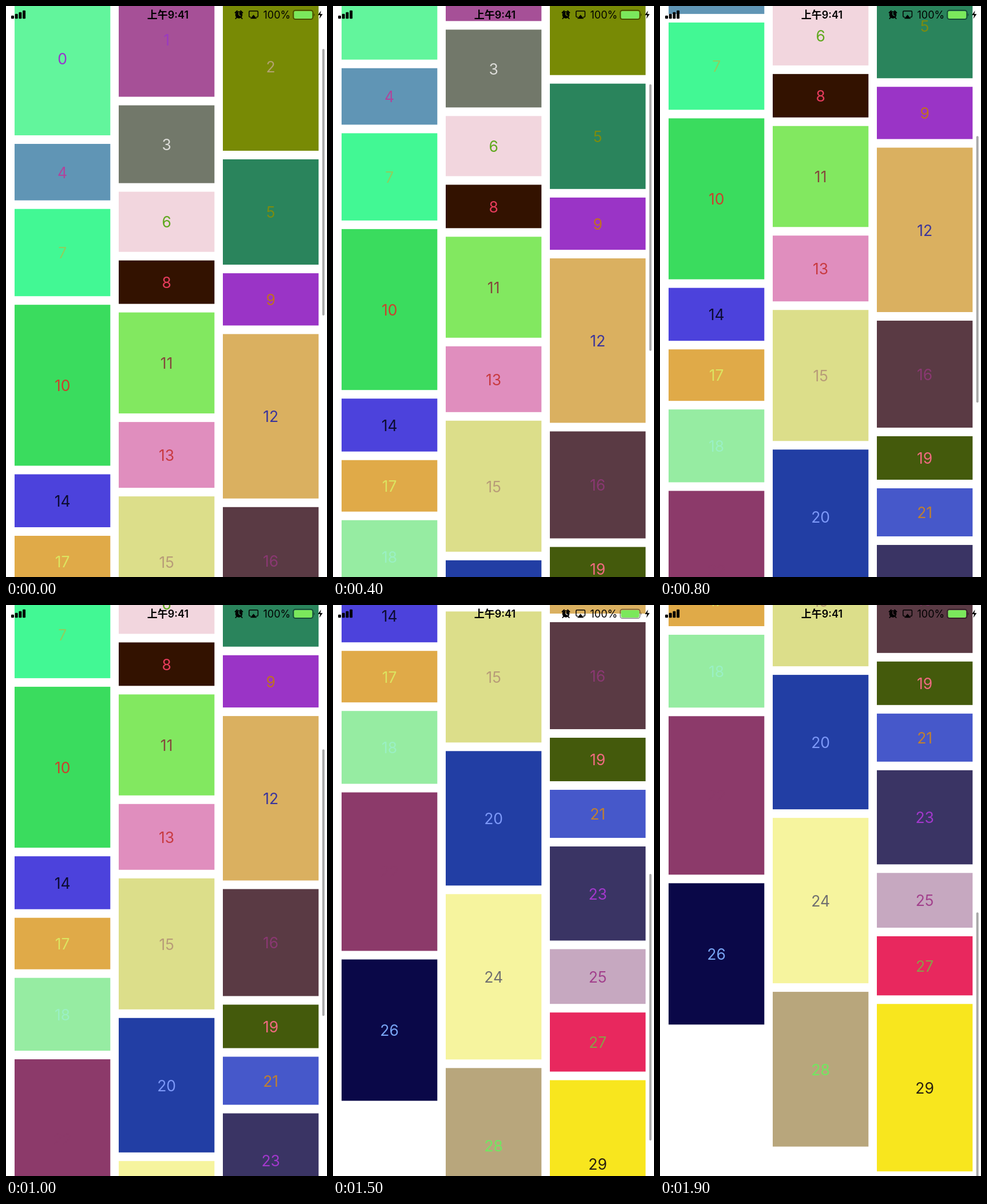
An HTML page for the animation above (2 s loop, 561 by 998 pixels).

```html
<!DOCTYPE html>
<html lang="zh">
<head>
<meta charset="utf-8">
<title>Waterfall layout</title>
<style>
  html, body { margin: 0; width: 100%; height: 100%; overflow: hidden; background: #fff; }
  svg { display: block; width: 561px; height: 998px; }
  text { font-family: Inter, "Noto Sans CJK SC", "Noto Sans CJK", sans-serif; }
  #cards text { font-size: 26.5px; text-anchor: middle; }
</style>
</head>
<body>
<svg viewBox="0 0 561 998">
  <g id="cards"></g>
  <rect id="bar" x="552.7" width="4" height="466" rx="2" fill="#000" fill-opacity=".34"/>

  <g id="signal"></g>
  <text x="283" y="21.5" font-size="18" font-weight="600" text-anchor="middle">上午9:41</text>

  <mask id="hands">
    <rect x="395" y="0" width="24" height="30" fill="#fff"/>
    <path d="M407 10.5V15.5L410 17.5" fill="none" stroke="#000" stroke-width="1.4"/>
  </mask>
  <g mask="url(#hands)">
    <circle cx="407" cy="15.4" r="6.3"/>
    <path d="M400.6 11.8L404 8.6M413.4 11.8L410 8.6M403 20L401.4 22M411 20L412.6 22"
          stroke="#000" stroke-width="2" stroke-linecap="round"/>
  </g>

  <path d="M428 19.5H426.5Q424.8 19.5 424.8 17.8V10.2Q424.8 8.7 426.5 8.7H438.7Q440.4 8.7 440.4 10.2V17.8Q440.4 19.5 438.7 19.5H437"
        fill="none" stroke="#000" stroke-width="1.5"/>
  <path d="M432.6 15.2L438.4 22.2H426.8Z"/>

  <text x="449.5" y="21.8" font-size="18">100%</text>
  <rect x="502" y="7.5" width="34.5" height="15.8" rx="3.8" fill="none" stroke="#000" stroke-opacity=".5" stroke-width="1.4"/>
  <rect x="503.4" y="8.9" width="31.7" height="13" rx="2.4" fill="#7be85c"/>
  <path d="M538 12.8Q540.6 15.4 538 18Z" fill-opacity=".5"/>
  <path d="M550.6 8L545 16H549L547.6 22.4L553.4 14H549.3Z"/>
</svg>

<script>
const WIDTH = 167.3, GAP = 15, PITCH = 182, TOP = -42;

// height, fill, label colour
const items = [
  [268, '#62f59c', '#9438cc'], [200.6, '#a65097', '#9a3bc0'], [295, '#788a05', '#b3a270'],
  [136, '#72786a', '#dcdcd8'], [98.7, '#6095b5', '#b0459c'], [184.1, '#2a845c', '#7c8c10'],
  [105.1, '#f2d6de', '#5ea81c'], [152.5, '#42f894', '#8cd060'], [75.9, '#331200', '#e83c5c'],
  [91.3, '#9a34c6', '#c07020'], [281.3, '#3adc5e', '#c8432e'], [176.5, '#82e860', '#84483c'],
  [287.4, '#dab060', '#3a349c'], [115, '#e08ebe', '#c83a40'], [92.5, '#4c42dc', '#0c0c30'],
  [229, '#dcde8a', '#b89c78'], [187, '#5a3a44', '#8a3872'], [90, '#e0aa48', '#dce460'],
  [127.3, '#96eca2', '#9af0c4'], [76, '#445a0c', '#f06a80'], [235, '#223ea4', '#7c98f8'],
  [84, '#4658ca', '#c08030'], [277, '#8c3a6a', '#8c3a6a'], [164.5, '#3a3464', '#a238cc'],
  [289, '#f6f49e', '#707070'], [95.7, '#c6a8c0', '#a2408c'], [247, '#0a0848', '#78a4f4'],
  [103.3, '#e8285e', '#8c9c48'], [270.5, '#b8a67c', '#70e860'], [292.6, '#f8e61e', '#2a2010']
];

const byId = id => document.getElementById(id);

function add(parent, tag, attributes, content = '') {
  const node = document.createElementNS('http://www.w3.org/2000/svg', tag);
  for (const key in attributes) node.setAttribute(key, attributes[key]);
  node.textContent = content;
  parent.append(node);
}

// Each card goes to the column that is shortest so far.
const cards = byId('cards');
const columnEnds = [TOP, TOP, TOP];
items.forEach(([height, fill, ink], index) => {
  const y = Math.min(...columnEnds);
  const column = columnEnds.indexOf(y);
  const x = 15 + column * PITCH;
  add(cards, 'rect', { x, y, width: WIDTH, height, fill });
  add(cards, 'text', { x: x + WIDTH / 2, y: y + height / 2 + 10.3, fill: ink }, index);
  columnEnds[column] += height + GAP;
});

for (let i = 0; i < 4; i++) {
  const height = 5.5 + 3 * i;
  add(byId('signal'), 'rect', { x: 9 + 6.7 * i, y: 22.3 - height, width: 5, height, rx: 1.2 });
}

// Flicks and glides: start step, start offset, speed ratio per step
const phases = [
  [0, 0, 0.8], [4, 132.3, 1.12], [6, 242.3, 0.8], [10, 379.3, 1.66],
  [12, 589.5, 0.8], [18, 977, 0.8], [19, 979]
];

function scrollAt(step) {
  const next = phases.findIndex(phase => phase[0] > step);
  if (next < 0) return phases[phases.length - 1][1];
  const [start, from, ratio] = phases[next - 1];
  const [end, to] = phases[next];
  return from + (to - from) * (1 - ratio ** (step - start)) / (1 - ratio ** (end - start));
}

function draw(now) {
  const scroll = scrollAt(Math.floor(now % 2000 / 100));
  cards.setAttribute('transform', `translate(0 ${-scroll})`);
  byId('bar').setAttribute('y', 75 + 0.467 * scroll + 0.038 * Math.max(0, scroll - 846));
}

let startTime;
function tick(now) {
  startTime ??= now;
  draw(now - startTime);
  requestAnimationFrame(tick);
}
draw(0);
requestAnimationFrame(tick);
</script>
</body>
</html>
```
